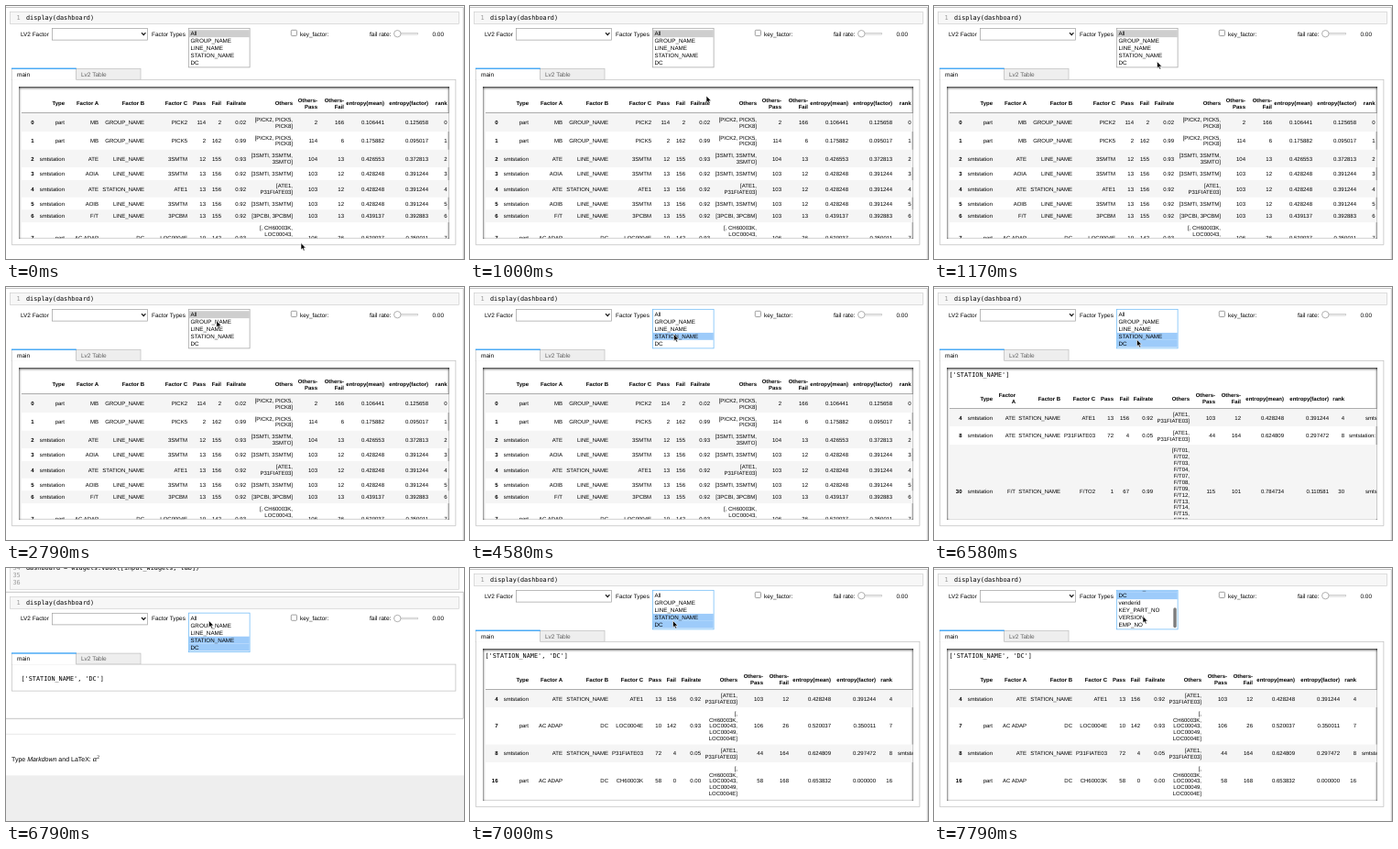
An HTML page that plays this animation: 500 px wide and 276 px high, repeating every 8 s.

```html
<!DOCTYPE html>
<html lang="en">
<head>
<meta charset="utf-8">
<title>Dashboard</title>
<style>
  html, body { margin: 0; width: 100%; height: 100%; overflow: hidden; background: #fff; }
  svg { display: block; width: 100%; height: 100%; }
  text { font-family: "Liberation Sans", Arial, sans-serif; white-space: pre; text-rendering: geometricPrecision; }
  .mono { font-family: "DejaVu Sans Mono", Menlo, monospace; }
</style>
</head>
<body>
<svg id="stage" viewBox="0 0 500 276"></svg>
<script>
const NS = 'http://www.w3.org/2000/svg';
const LOOP = 8000;
const stage = document.getElementById('stage');

function add(parent, tag, attrs = {}, content) {
  const node = document.createElementNS(NS, tag);
  for (const key in attrs) node.setAttribute(key, attrs[key]);
  if (content !== undefined) node.textContent = content;
  parent.appendChild(node);
  return node;
}
const group = (parent, attrs) => add(parent, 'g', attrs);
const rect = (parent, x, y, width, height, fill, stroke = 'none') =>
  add(parent, 'rect', { x, y, width, height, fill, stroke, 'stroke-width': 0.7 });
const path = (parent, d, stroke, width = 0.7, fill = 'none') =>
  add(parent, 'path', { d, stroke, 'stroke-width': width, fill });
// y is the vertical middle of the line
const label = (parent, x, y, str, size = 6.4, attrs = {}) =>
  add(parent, 'text', { x, y: y + size * 0.36, 'font-size': size, ...attrs }, str);
const code = (parent, x, y, str, fill = '#000') =>
  label(parent, x, y, str, 6.84, { class: 'mono', fill });
const show = (node, on) => node.setAttribute('display', on ? 'inline' : 'none');
const shift = (node, x, y) => node.setAttribute('transform', `translate(${x} ${y})`);

function clip(id, x, y, w, h) {
  rect(add(defs, 'clipPath', { id }), x, y, w, h, '#000');
  return `url(#${id})`;
}

const defs = add(stage, 'defs');
const areaClip = clip('area', 14, 88, 470, 166);
const tableClip = clip('table', 16, 89, 467.5, 164.3);
const listClip = clip('list', 199.5, 24.5, 66.5, 42);
add(add(defs, 'filter', { id: 'soft', x: '-10%', y: '-10%', width: '120%', height: '120%' }),
  'feGaussianBlur', { stdDeviation: 1.8 });

rect(stage, 0, 0, 500, 276, '#fff');
const page = group(stage);

// cell above and below, seen while the output is empty
const around = group(page);
rect(around, 4.5, -40, 490, 38.5, '#f7f7f7', '#cfcfcf');
code(around, 22, -25.3, 'dashboard = widgets.VBox([input_widgets, tab])');
['34', '35', '36'].forEach((n, i) => code(around, 7.5, -25.3 + i * 8.2, n, '#999'));
path(around, 'M0 139.5H499', '#ababab');
path(around, 'M0 156.5H491', '#dedede');
const hint = label(around, 6, 183.3, 'Type ', 7);
add(hint, 'tspan', { 'font-style': 'italic' }, 'Markdown');
add(hint, 'tspan', {}, ' and LaTeX: ');
add(hint, 'tspan', { 'font-style': 'italic', 'font-family': 'Liberation Serif, serif', 'font-size': 8.5 }, 'α');
add(hint, 'tspan', { 'font-family': 'Liberation Serif, serif', 'font-size': 5.5, dy: -3 }, '2');
rect(around, 0, 201.5, 500, 60, '#eee');

// code cell
path(page, 'M0 1.5H499.3', '#ababab');
const side = path(page, '', '#ababab');
rect(page, 4.5, 6.5, 490, 13, '#f7f7f7', '#cfcfcf');
code(page, 11.6, 12.7, '1', '#999');
code(page, 22, 12.7, 'display(dashboard)');

// controls
label(page, 16, 30.3, 'LV2 Factor');
rect(page, 50.5, 24.5, 104, 12.6, '#fff', '#9e9e9e');
path(page, 'M148 29.2L150.2 31.6L152.4 29.2', '#111', 1.2);
label(page, 159, 30.3, 'Factor Types');
add(page, 'rect', { x: 311.3, y: 26.3, width: 6.2, height: 6.2, rx: 1, fill: '#fff', stroke: '#777', 'stroke-width': 0.7 });
label(page, 321, 30.3, 'key_factor:');
label(page, 397, 30.3, 'fail rate:', 6.6);
rect(page, 424, 29.4, 25.5, 1.6, '#fff', '#bdbdbd');
add(page, 'circle', { cx: 427.3, cy: 30.2, r: 3.7, fill: '#fff', stroke: '#9e9e9e', 'stroke-width': 0.8 });
label(page, 465.5, 30.3, '0.00');

// list box
const PITCH = 7.9;
const options = ['All', 'GROUP_NAME', 'LINE_NAME', 'STATION_NAME', 'DC',
  'venderid', 'KEY_PART_NO', 'VERSION', 'EMP_NO'];
const listFrame = rect(page, 199.5, 24.3, 66.6, 42.6, '#fff', '#9e9e9e');
const list = group(group(page, { 'clip-path': listClip }));
const marks = options.map((name, i) => {
  const mark = rect(list, 200, 26.2 + i * PITCH, 65.8, PITCH, 'none');
  label(list, 201.5, 30.1 + i * PITCH, name, 6.25);
  return mark;
});
const thumb = add(page, 'rect', { x: 261.3, width: 3.4, height: 22, rx: 1.7, fill: '#7d7d7d' });

// tabs
rect(page, 76.5, 68.3, 70.5, 12, '#eee', '#bdbdbd');
label(page, 82, 74.2, 'Lv2 Table', 6.5, { fill: '#616161' });
const panel = rect(page, 6.3, 80.3, 484.6, 180, '#fff', '#bdbdbd');
rect(page, 6.3, 68.3, 70.2, 12.6, '#fff');
path(page, 'M6.3 81V68.3M76.5 80.3V68.3', '#bdbdbd');
rect(page, 6, 67.6, 70.8, 1.2, '#2196f3');
label(page, 12, 74.2, 'main', 6.5);

// scrolled output with its inner shadow
const output = group(page);
path(group(output, { 'clip-path': areaClip }), 'M4 78H494V264H4ZM14 89V255H484V89Z', 'none', 0, '#000')
  .setAttribute('style', 'fill-rule:evenodd;filter:url(#soft)');

const LINE = 6.9;
const HEAD = '|Type|Factor A|Factor B|Factor C|Pass|Fail|Failrate|Others|Others-~Pass|Others-~Fail|entropy(mean)|entropy(factor)|rank';

// "~" breaks a line inside a cell
function cell(parent, right, y, str, bold) {
  const lines = str.split('~');
  lines.forEach((line, i) => label(parent, right, y + (i - (lines.length - 1) / 2) * LINE, line, 6,
    { 'text-anchor': 'end', 'font-weight': bold ? 700 : 400 }));
}

function table(cols, head, headY, top, rows) {
  const g = group(output, { 'clip-path': tableClip });
  head.split('|').forEach((str, i) => cell(g, cols[i], headY, str, true));
  let y = top;
  const bands = rows.map(([height, line, extra, extraX], i) => {
    const base = i % 2 ? 'none' : '#f5f5f5';
    const node = rect(g, 17, y, 467, height, base);
    line.split('|').forEach((str, c) => cell(g, cols[c], y + height / 2, str, c === 0));
    if (extra) label(g, extraX, y + height / 2, extra, 6);
    y += height;
    return { node, base, top: y - height, bottom: y };
  });
  path(g, `M17 ${top - 0.5}H484`, '#888');
  return { g, bands };
}

const adap = '[,~CH60003K,~LOC00043,~LOC00049,~LOC0004E]';
const ate = '[ATE1,~P31FIATE03]';
const stations = '[' + ['01', '02', '03', '04', '07', '08', '09', '12', '13', '14', '15', '16', '17', '18]']
  .map(n => 'F/T' + n).join(',~');

const tables = [
  table([30.5, 64, 101, 151, 198, 218, 235, 262, 313, 340, 369, 413, 461, 481.5], HEAD, 106.3, 117, [
    [20, '0|part|MB|GROUP_NAME|PICK2|114|2|0.02|[PICK2, PICK5,~PICK8]|2|166|0.106441|0.125658|0'],
    [19.7, '1|part|MB|GROUP_NAME|PICK5|2|162|0.99|[PICK2, PICK5,~PICK8]|114|6|0.175882|0.095017|1'],
    [19.3, '2|smtstation|ATE|LINE_NAME|3SMTM|12|155|0.93|[3SMTI, 3SMTM,~3SMTO]|104|13|0.426553|0.372813|2'],
    [14, '3|smtstation|AOIA|LINE_NAME|3SMTM|13|156|0.92|[3SMTI, 3SMTM]|103|12|0.428248|0.391244|3'],
    [18.7, '4|smtstation|ATE|STATION_NAME|ATE1|13|156|0.92|' + ate + '|103|12|0.428248|0.391244|4'],
    [13.5, '5|smtstation|AOIB|LINE_NAME|3SMTM|13|156|0.92|[3SMTI, 3SMTM]|103|12|0.428248|0.391244|5'],
    [13.8, '6|smtstation|F/T|LINE_NAME|3PCBM|13|155|0.92|[3PCBI, 3PCBM]|103|13|0.439137|0.392883|6'],
    [33, '7|part|AC ADAP|DC|LOC0004E|10|142|0.93|' + adap.replace('~', ' ') + '|106|26|0.520037|0.350011|7']
  ]),
  table([30.5, 64, 89, 138, 176, 196, 213, 239, 279, 307, 335, 382, 431, 448],
    HEAD.replace('Factor A', 'Factor~A'), 121.6, 133, [
    [19, '4|smtstation|ATE|STATION_NAME|ATE1|13|156|0.92|' + ate + '|103|12|0.428248|0.391244|4', 'smtstation', 471],
    [20, '8|smtstation|ATE|STATION_NAME|P31FIATE03|72|4|0.05|' + ate + '|44|164|0.624809|0.297472|8', 'smtstation:', 453],
    [102, '30|smtstation|F/T|STATION_NAME|F/TO2|1|67|0.99|' + stations + '|115|101|0.784734|0.110581|30', 'smtstation', 471]
  ]),
  table([30.5, 64, 101, 151, 189, 209, 225, 252, 292, 320, 348, 394, 443, 461], HEAD, 121.6, 133, [
    [19, '4|smtstation|ATE|STATION_NAME|ATE1|13|156|0.92|' + ate + '|103|12|0.428248|0.391244|4'],
    [40.5, '7|part|AC ADAP|DC|LOC0004E|10|142|0.93|' + adap + '|106|26|0.520037|0.350011|7'],
    [19.5, '8|smtstation|ATE|STATION_NAME|P31FIATE03|72|4|0.05|' + ate + '|44|164|0.624809|0.297472|8', 'smtstation', 467],
    [40.5, '16|part|AC ADAP|DC|CH60003K|58|0|0.00|' + adap + '|58|168|0.653832|0.000000|16']
  ])
];
const printed = code(page, 16.5, 95.3, '');

const pointer = path(stage, 'M0 0V7.4L1.7 5.9L2.9 8.6L4.2 8L3 5.4H5.3Z', '#fff', 0.6, '#000');

// time, x, y of the pointer tip
const track = [
  [580, 322, 258.5], [1000, 258, 98], [1170, 243.5, 60.5], [1380, 242, 55], [1790, 238, 46.5],
  [2790, 229.8, 36.8], [3170, 229, 37.5], [4170, 222.5, 51.5], [4580, 222.5, 51.5],
  [5380, 221.5, 57], [7000, 221.5, 57.5], [7580, 228, 52.5]
];

function along(t) {
  const i = track.findIndex(k => k[0] > t);
  if (i === 0) return track[0].slice(1);
  if (i < 0) return track[track.length - 1].slice(1);
  const [a, b] = [track[i - 1], track[i]];
  const p = (t - a[0]) / (b[0] - a[0]);
  return [a[1] + (b[1] - a[1]) * p, a[2] + (b[2] - a[2]) * p];
}

function snap(t) {
  const second = Math.floor(t / 1000) * 1000;
  return second + [790, 580, 380, 170, 0].find(s => s <= t - second);
}

function render(time) {
  const t = snap(time % LOOP);
  const [x, y] = along(t);
  const stationOn = t >= 4580, dcOn = t >= 6580;
  const empty = (t >= 4790 && t < 5000) || (t >= 6790 && t < 7000);
  const current = t < 4790 ? 0 : t < 6790 ? 1 : 2;

  shift(page, 0, empty ? 24.8 : 0);
  show(around, empty);
  show(output, !empty);
  panel.setAttribute('height', empty ? 29 : 180);
  side.setAttribute('d', `M499.3 1.5V${empty ? 139.5 : 276}`);
  printed.textContent = ['', "['STATION_NAME']", "['STATION_NAME', 'DC']"][current];

  tables.forEach(({ g, bands }, i) => {
    show(g, i === current);
    for (const b of bands) {
      const hover = y > b.top && y < Math.min(b.bottom, 253);
      b.node.setAttribute('fill', hover ? '#d9edfd' : b.base);
    }
  });

  const on = stationOn ? (dcOn ? [3, 4] : [3]) : [0];
  marks.forEach((m, i) => m.setAttribute('fill', on.includes(i) ? (stationOn ? '#9dcbfa' : '#cecece') : 'none'));
  listFrame.setAttribute('stroke', stationOn ? '#64b5f6' : '#9e9e9e');
  const p = Math.min(1, Math.max(0, (t - 7170) / 410));
  shift(list, 0, -4 * PITCH * p);
  thumb.setAttribute('y', 25.5 + 17.8 * p);
  show(thumb, p > 0);

  shift(pointer, x, y);
}

const start = performance.now();
function tick() {
  render(performance.now() - start);
  requestAnimationFrame(tick);
}
tick();
</script>
</body>
</html>
```
